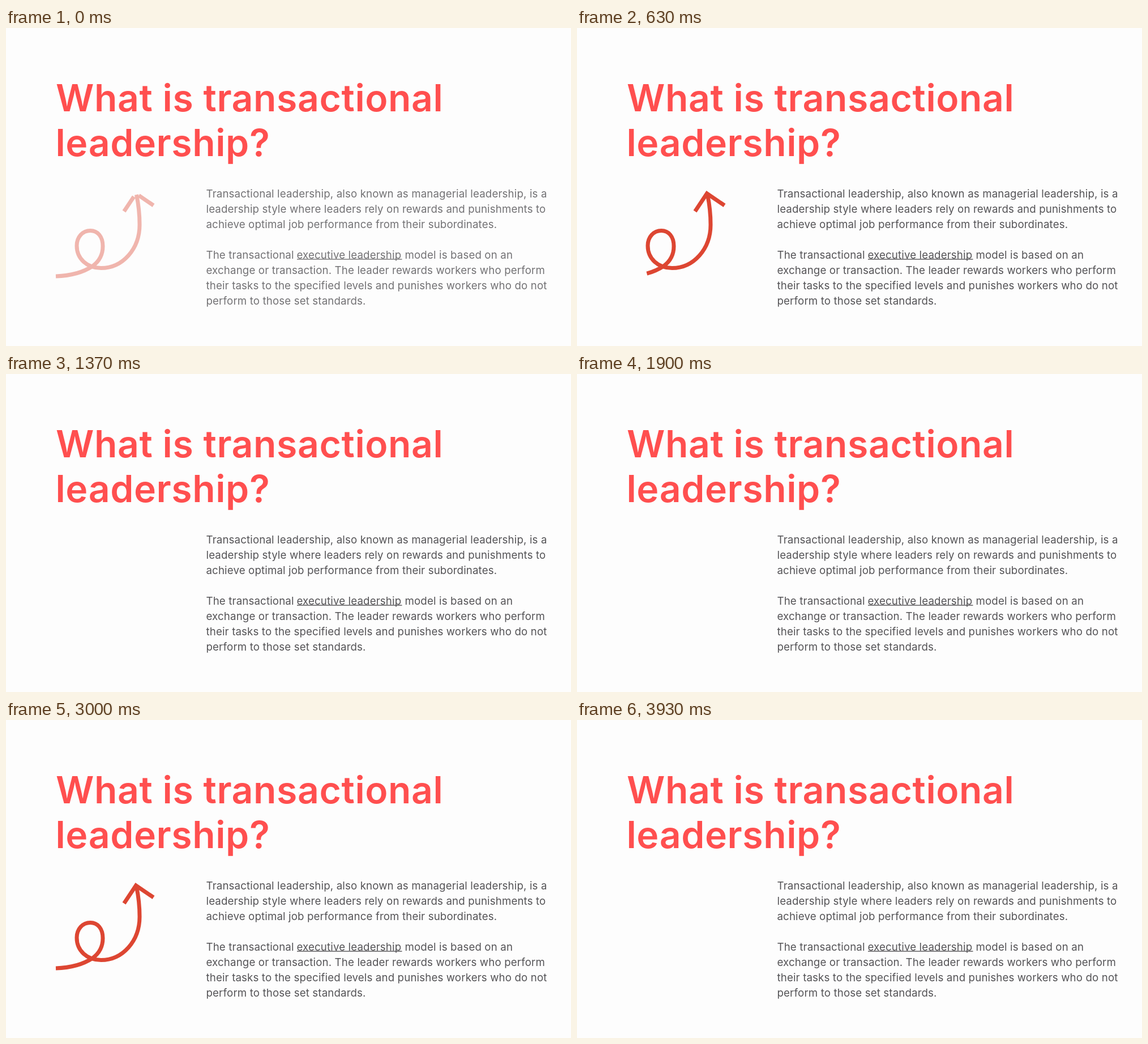
Write an HTML page that moves like this. It is 998 by 561 pixels and loops after 3.96 s.

```html
<!DOCTYPE html>
<html lang="en">
<head>
<meta charset="utf-8">
<title>Transactional leadership</title>
<style>
  html, body { margin: 0; width: 100%; height: 100%; overflow: hidden; background: #fdfdfd; }
  svg { display: block; width: 100vw; height: 100vh; }
  text { font-family: Inter, "Open Sans", sans-serif; }
  #title { font-size: 66px; font-weight: 600; letter-spacing: 0.6px; fill: #ff4f4f; }
  #body { font-size: 18.7px; letter-spacing: 0.13px; fill: #545356; }
  #arrow { fill: none; stroke: #dd4632; stroke-width: 7; stroke-miterlimit: 10; }
</style>
</head>
<body>
<svg viewBox="0 0 998 561">
  <g id="title">
    <text x="88" y="146.5">What is transactional</text>
    <text x="87.5" y="225.5">leadership?</text>
  </g>
  <g id="body">
    <text x="353.5" y="298.5">Transactional leadership, also known as managerial leadership, is a</text>
    <text x="353.5" y="325.5">leadership style where leaders rely on rewards and punishments to</text>
    <text x="353.5" y="352.5">achieve optimal job performance from their subordinates.</text>
    <text x="353.5" y="406.5">The transactional <tspan x="513.5">executive leadership</tspan> <tspan x="704.5">model is based on an</tspan></text>
    <text x="353.5" y="433.5">exchange or transaction. The leader rewards workers who perform</text>
    <text x="353.5" y="460.5">their tasks to the specified levels and punishes workers who do not</text>
    <text x="353.5" y="487.5">perform to those set standards.</text>
    <rect x="514" y="407.3" width="185.5" height="1.4"/>
  </g>
  <g id="arrow">
    <path id="shaft" pathLength="1" d="M88 438C118 437 138 430 153 420C164 412 171 400 171 385C171 368 162 357.5 149 357.5C135 357.5 125 369 125 384C125 407 143 423.5 168 423.5C206 423.5 236 390 236 347C236 329 234 311 230.5 294"/>
    <path id="head" pathLength="1" d="M208.5 323.5L229.5 292L260.5 313"/>
  </g>
</svg>
<script>
  const LOOP = 3960, CYCLE = 2870, REDRAW = 2365;
  const FADE_RATE = 0.00213;
  const [body, arrow, shaft, head] =
    ['body', 'arrow', 'shaft', 'head'].map(id => document.getElementById(id));

  const clamp = x => Math.min(1, Math.max(0, x));
  const ease = x => x < 0.5 ? 4 * x ** 3 : 1 - 4 * (1 - x) ** 3;
  const progress = (t, start, duration) => ease(clamp((t - start) / duration));

  function setDash(path, from, to, dashes) {
    path.style.display = to - from > 0.0005 ? '' : 'none';
    path.setAttribute('stroke-dasharray', dashes.join(' '));
  }

  function trimShaft(from, to) {
    setDash(shaft, from, to, [0, from, to - from, 2]);
  }

  // Both halves of the head grow from their outer ends towards the tip.
  function trimHead(from, to) {
    const half = (to - from) / 2;
    setDash(head, from, to, to === 1
      ? [0, from / 2, 1 - from, 2]
      : [0, from / 2, half, 1 - to, half, 2]);
  }

  function render(time) {
    const t = time % LOOP;
    body.setAttribute('opacity', clamp(0.82 + t * FADE_RATE));
    arrow.setAttribute('opacity', clamp(0.39 + t * FADE_RATE));

    const u = t < REDRAW ? t : t - CYCLE;
    trimShaft(progress(u, 475, 560), progress(u, -505, 500));
    trimHead(progress(u, 930, 110), progress(u, -75, 115));
  }

  let origin;
  function tick(now) {
    origin ??= now;
    render(now - origin);
    requestAnimationFrame(tick);
  }
  render(0);
  requestAnimationFrame(tick);
</script>
</body>
</html>
```
